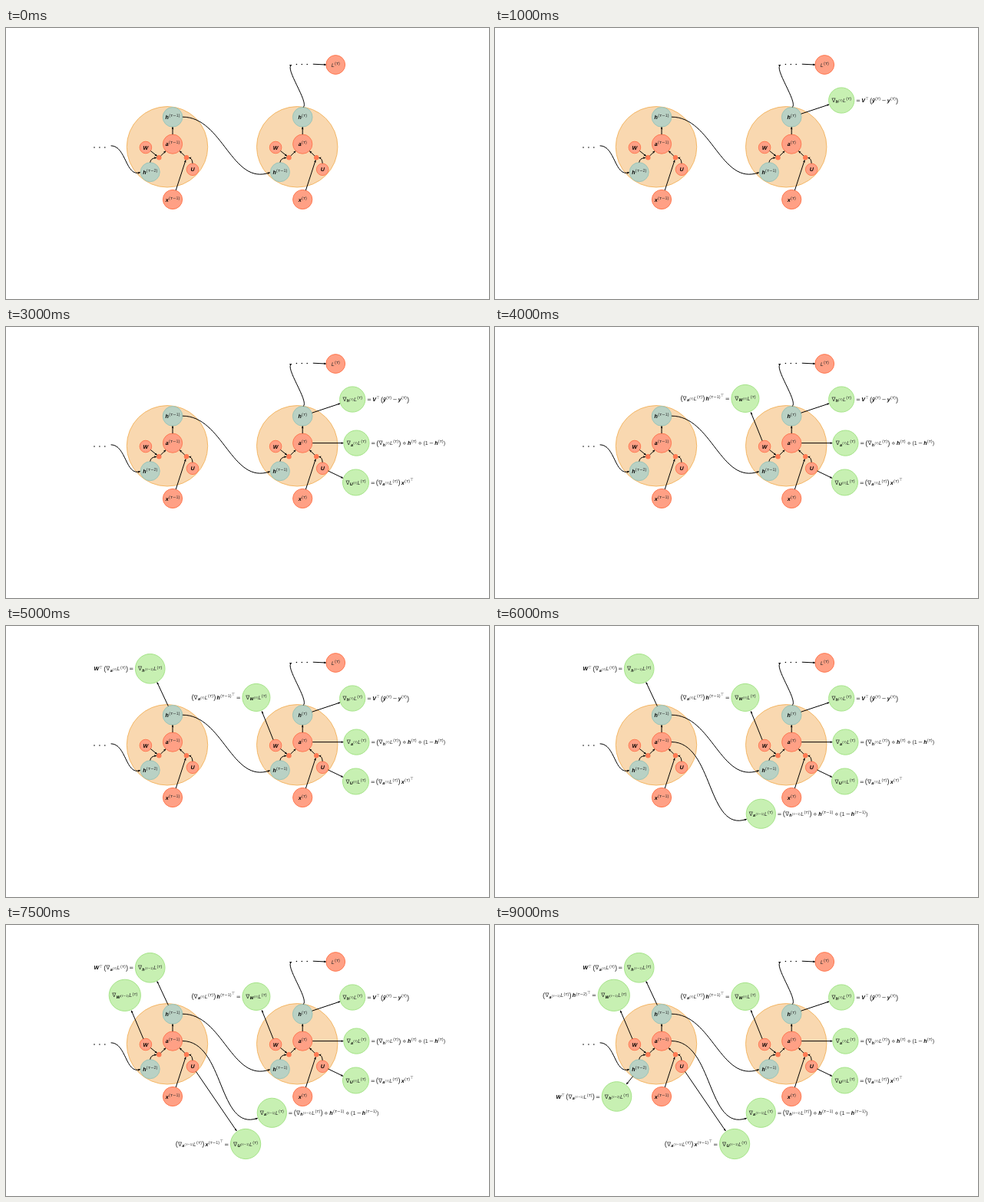
Recreate the animation shown at these times as an HTML page. Size 629x354 px, loop 9.5 s.

```html
<!DOCTYPE html>
<html lang="en">
<head>
<meta charset="utf-8">
<title>Backpropagation through time</title>
<style>
html, body { margin: 0; width: 100%; height: 100%; overflow: hidden; background: #fff; }
svg { display: block; width: 629px; height: 354px; }
text { font-family: "Liberation Sans", Arial, sans-serif; text-rendering: geometricPrecision; fill: #2a2a2a; }
.bold { font-weight: bold; font-style: italic; fill: #000; }
.italic { font-style: italic; }
.greek { font-family: "DejaVu Sans", sans-serif; font-style: italic; }
.op { font-family: "DejaVu Sans", sans-serif; }
.edge { fill: none; stroke: #000; stroke-width: 1; marker-end: url(#tip); }
.cell { fill: #f9d8b0; stroke: #f4b868; }
.red { fill: #ffa085; stroke: #ff7a52; }
.teal { fill: #b9d1c4; stroke: #9cc5b8; }
.green { fill: #c7f0b2; stroke: #a5e488; }
.dot { fill: #ff7a52; }
</style>
</head>
<body>
<svg id="stage" viewBox="0 0 629 354">
  <defs>
    <marker id="tip" markerUnits="userSpaceOnUse" markerWidth="5" markerHeight="4" refX="3" refY="1.4" orient="auto">
      <path d="M0 0L3.4 1.4L0 2.8L.8 1.4Z"/>
    </marker>
  </defs>
</svg>
<script>
const SIZE = 7.1, STEP = 500, LOOP = 9500, SHIFT = 169.2;
const stage = document.getElementById('stage');

const styleOf = c =>
  /[hWUVaxyŷ]/.test(c) ? 'bold' : c === 'L' ? 'italic' : c === 'τ' ? 'greek' : /[∇=−∘⊤]/.test(c) ? 'op' : '';

// ^ and _ open a script, } closes it, [ ] are tall parentheses, a space is a thin gap
function math(source, x, y, anchor = 'middle') {
  const stack = [{ y: 0, size: SIZE }];
  let spans = '', lastY = 0, gap = 0;
  for (const c of source) {
    const top = stack[stack.length - 1];
    if (c === '^' || c === '_') {
      stack.push({ y: top.y + top.size * (c === '^' ? -0.38 : 0.2), size: top.size * 0.76 });
      gap += 0.3;
    } else if (c === '}') {
      stack.pop();
      gap += 0.2;
    } else if (c === ' ') {
      gap += 1.2;
    } else {
      const tall = c === '[' || c === ']';
      const size = tall ? 9.4 : c === '⊤' ? 5 : c === '∘' ? 10 : c === '∇' ? top.size * 1.06 : top.size;
      const base = top.y + (tall ? 0.5 : c === '∘' ? 0.9 : 0);
      const glyph = c === '[' ? '(' : c === ']' ? ')' : c;
      spans += `<tspan class="${styleOf(c)}" font-size="${size}" dx="${gap}" dy="${base - lastY}">${glyph}</tspan>`;
      lastY = base;
      gap = 0;
    }
  }
  return `<text x="${x}" y="${y + 2.5}" text-anchor="${anchor}">${spans}</text>`;
}

const circle = (kind, x, y, r) => `<circle class="${kind}" cx="${x}" cy="${y}" r="${r}"/>`;
const node = (kind, x, y, r, label) => circle(kind, x, y, r) + math(label, x, y);
const edge = d => `<path class="edge" d="${d}"/>`;
const ellipsis = (x, y) => [0, 6.9, 13.8].map(d => `<circle cx="${x + d}" cy="${y}" r=".8"/>`).join('');

// leaves level, arrives rising by 20 degrees
function sweep(x1, y1, x2, y2) {
  const pull = 0.39 * Math.hypot(x2 - x1, y2 - y1);
  return `M${x1} ${y1}C${x1 + pull} ${y1} ${x2 - pull * 0.94} ${y2 + pull * 0.34} ${x2} ${y2}`;
}

function cell(x, now, before) {
  return `<g transform="translate(${x})">` +
    circle('cell', 210, 155.3, 52.7) +
    node('teal', 217, 116.4, 12.8, `h^${now}}`) +
    node('red', 217, 151.6, 12.6, `a^${now}}`) +
    node('red', 181.9, 156, 7.8, 'W') +
    node('red', 243, 184.8, 7.8, 'U') +
    node('teal', 187.7, 188.2, 12.5, `h^${before}}`) +
    node('red', 217, 224, 12.6, `x^${now}}`) +
    circle('dot', 199.3, 169.3, 3.2) + circle('dot', 235, 169.3, 3.2) +
    ['M188.3 160.5L196.6 167.2', 'M187.7 175.6Q188.5 169.8 195.9 169.5', 'M201.5 167L208 160.8',
     'M232.7 167L226.2 160.8', 'M243 176.8Q242.5 170 238.4 169.5', 'M221.2 212L234 172.6',
     'M217 139V129.5'].map(edge).join('') + '</g>';
}

const T = '(τ)', P = '(τ−1)', PP = '(τ−2)';
const grad = (v, t) => `∇_${v}^${t}}}L^${T}}`;
const chain = t => `= [${grad('h', t)}] ∘ h^${t}} ∘ (1 − h^${t}})`;

// x, y, radius, label, edge, formula, formula side (1 right, -1 left)
const gradients = [
  [451.2, 94.5, 16.6, grad('h', T), 'M398.5 112.2L435 100', `= V^⊤} [ŷ^${T}} − y^${T}}]`, 1],
  [456.4, 151.6, 16.6, grad('a', T), 'M399.2 151.6H439.4', chain(T), 1],
  [455.5, 203, 17, grad('U', T), 'M419.6 188L438.8 197.3', `= [${grad('a', T)}] x^${T}^⊤}}`, 1],
  [325.9, 93.4, 18, grad('W', T), 'M348 148.6L333.2 111.4', `[${grad('a', T)}] h^${P}^⊤}} =`, -1],
  [187.7, 55.8, 19.3, grad('h', P), 'M211.3 104.7L196.8 73.6', `W^⊤} [${grad('a', T)}] =`, -1],
  [346.3, 245.3, 19.1, grad('a', P), sweep(229.8, 151.5, 327.6, 252.3), chain(P), 1],
  [312.1, 286, 19.6, grad('U', P), 'M247.5 191.5L300.3 269', `[${grad('a', P)}] x^${P}^⊤}} =`, -1],
  [154.8, 91.8, 20.6, grad('W', P), 'M178.9 148.7L163.3 111.8', `[${grad('a', P)}] h^${PP}^⊤}} =`, -1],
  [158.5, 224, 19.3, grad('h', PP), 'M179.6 197.6L171.2 208', `W^⊤} [${grad('a', P)}] =`, -1],
];

const reveal = content => `<g class="reveal">${content}</g>`;

stage.innerHTML += cell(0, P, PP) + cell(SHIFT, T, P) +
  node('red', 429.2, 48, 12.4, `L^${T}}`) +
  ellipsis(115, 156) + ellipsis(378.4, 47.5) +
  [sweep(136.6, 153.8, 174.6, 188.6), sweep(229.9, 116.2, 343.6, 188.8),
   'M387.2 103.6C395 97 362 52 372 48.2', 'M399.8 47.2L416.6 48'].map(edge).join('') +
  gradients.map(([x, y, r, label, path, formula, side]) =>
    reveal(edge(path) + node('green', x, y, r, label)) +
    reveal(math(formula, x + side * (r + 2.2), y, side > 0 ? 'start' : 'end'))).join('');

const parts = [...document.querySelectorAll('.reveal')];

function draw() {
  const step = Math.floor(performance.now() % LOOP / STEP);
  parts.forEach((part, i) => part.style.visibility = i < step ? 'visible' : 'hidden');
  requestAnimationFrame(draw);
}
draw();
</script>
</body>
</html>
```
